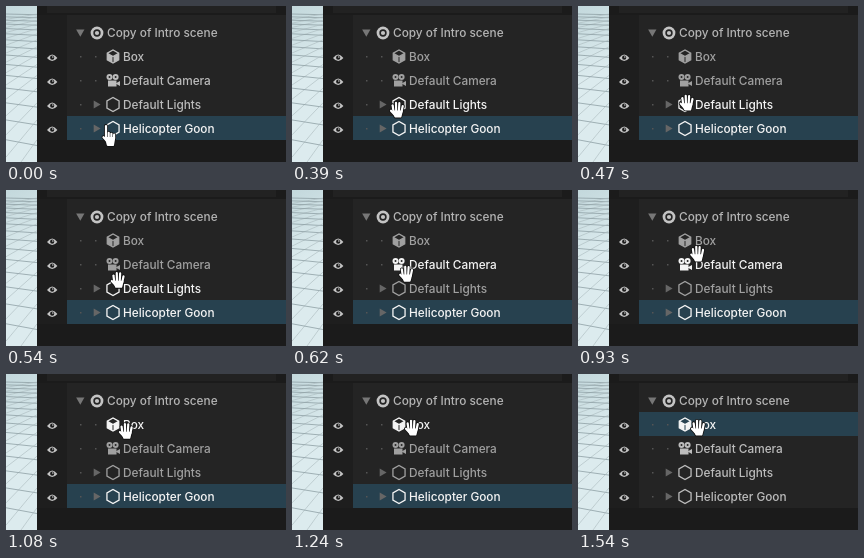
An HTML page with a canvas that plays this animation: 280x156 px, repeating every 2390 ms.

```html
<!DOCTYPE html>
<html lang="en">
<head>
<meta charset="utf-8">
<title>Scene tree drag</title>
<style>
html, body { margin: 0; width: 100%; height: 100%; overflow: hidden; background: #1b1b1b; }
canvas { display: block; }
</style>
</head>
<body>
<canvas id="stage" width="280" height="156"></canvas>
<script>
const ctx = document.getElementById('stage').getContext('2d');
const LOOP = 2390, GRAB = 390, STOP = 1240, DROP = 1540, MOVES = 11;
const NORMAL = '#bcbcbc', DIM = '#a0a0a0', BRIGHT = '#f4f4f4', PANEL = '#242424', SELECTED = '#27414f';
const rows = [['Box', cube], ['Default Camera', camera], ['Default Lights', hexagon], ['Helicopter Goon', hexagon]];
const range = n => [...Array(n).keys()];
const rowY = i => 51 + 24 * i;

// The cursor moves in even steps, rounded down to 10 ms
const steps = range(MOVES + 1).map(k => 10 * Math.floor((GRAB + k * (STOP - GRAB) / MOVES) / 10));

function rect(x, y, w, h, color) {
  ctx.fillStyle = color;
  ctx.fillRect(x, y, w, h);
}

function trace(points, close) {
  ctx.beginPath();
  points.forEach(p => ctx.lineTo(...p));
  if (close) ctx.closePath();
}

function poly(points, color) {
  trace(points, true);
  ctx.fillStyle = color;
  ctx.fill();
}

function line(points, color, width, close) {
  trace(points, close);
  ctx.strokeStyle = color;
  ctx.lineWidth = width;
  ctx.stroke();
}

function disc(x, y, r, color) {
  ctx.beginPath();
  ctx.arc(x, y, r, 0, 7);
  ctx.fillStyle = color;
  ctx.fill();
}

function triangle(x, y, r, angle, color) {
  poly(range(3).map(i => angle + i * Math.PI * 2 / 3)
    .map(a => [x + r * Math.cos(a), y + r * Math.sin(a)]), color);
}

function label(text, x, y, color) {
  ctx.font = '500 11.8px Inter, "Open Sans", sans-serif';
  ctx.fillStyle = color;
  ctx.fillText(text, x, y + 4);
}

const hexPoints = (y, r) => range(6).map(i => {
  const a = (i - 0.5) * Math.PI / 3;
  return [107 + r * Math.cos(a), y + r * Math.sin(a)];
});

function hexagon(y, color) {
  line(hexPoints(y, 7), color, 1.3, true);
}

function cube(y, color, back) {
  const p = hexPoints(y, 6.6), center = [107, y];
  poly(p, color);
  poly([center, p[4], p[5], p[0]], back);
  line([center, p[2]], back, 1);
  line([p[4], center, p[0]], color, 1.2);
  line(p, color, 1.3, true);
}

function camera(y, color, back) {
  for (const x of [103.5, 109.6]) {
    disc(x, y - 3.4, 3, color);
    disc(x, y - 3.4, 1, back);
  }
  rect(102, y, 8.5, 6, color);
  triangle(112.5, y + 3, 3, Math.PI, color);
}

function eye(y) {
  ctx.beginPath();
  ctx.moveTo(41, y + 1);
  ctx.quadraticCurveTo(46.2, y - 6, 51.4, y + 1);
  ctx.quadraticCurveTo(46.2, y + 7, 41, y + 1);
  ctx.fillStyle = '#c4c4c4';
  ctx.fill();
  disc(46.2, y + 0.7, 2.1, '#1c1c1c');
  disc(46.8, y, 0.8, '#c4c4c4');
}

function viewport() {
  const sky = ctx.createLinearGradient(0, 0, 31, 60);
  sky.addColorStop(0, '#c3d8dc');
  sky.addColorStop(1, '#dcebee');
  rect(0, 0, 31, 156, sky);
  for (const i of range(15)) {
    const depth = 18 * 1.16 ** i, y = depth - 10;
    line([[0, y], [31, y + depth * 0.04]], '#8fa0a5', 0.8);
    line([[0, y + depth * 0.3], [31, y]], '#a9b9bd', 0.6);
  }
}

function hand(x, y, open) {
  const tipY = i => open ? 1.3 * (i - 1.4) ** 2 - 6.8 : i ? i * 0.9 - 4 : -10;
  const spread = open ? 1.25 : 1;
  const fingers = range(4).map(i => 2.7 * i - 3.5).map((fx, i) => [[fx, 2], [fx * spread, tipY(i)]]);
  const thumb = [[-2.5, 5], [-6, 1.2]];
  const palm = [[-3.4, 2], [4.6, 2], [3.4, open ? 7 : 9], [-1.6, open ? 7 : 9]];
  ctx.save();
  ctx.translate(x, y);
  ctx.lineCap = ctx.lineJoin = 'round';
  for (const [color, width] of [['#111', 3.8], ['#fff', 2.2]]) {
    for (const part of [...fingers, thumb]) line(part, color, width);
    line(palm, color, width, true);
    poly(palm, color);
  }
  ctx.restore();
}

function cursorAt(t) {
  if (t < GRAB) return [103.5, 130];
  const left = 1 - (steps.filter(s => s <= t).length - 1) / MOVES;
  return [120 - 15 * left ** 3, 53.5 + 50 * left ** 1.6];
}

function draw(t) {
  const dragging = t >= GRAB && t < DROP;
  const selected = t < DROP ? 3 : 0;
  const [x, y] = cursorAt(t);
  const hover = Math.round((y - 50) / 24);

  viewport();
  rect(31, 0, 249, 156, '#1b1b1b');
  rect(31, 9, 30, 125, '#1e1e1e');
  rect(61, 9, 219, 125, PANEL);
  rect(41, 0, 229, 7, '#222');
  rect(61, rowY(selected) - 13, 219, 24, SELECTED);

  triangle(74.3, 26, 4.8, Math.PI / 2, '#777');
  disc(91, 27, 6.4, '#c4c4c4');
  disc(91, 27, 3.7, PANEL);
  disc(91, 27, 2.1, '#c4c4c4');
  label('Copy of Intro scene', 101, 27, '#b4b4b4');

  rows.forEach(([name, icon], i) => {
    const cy = rowY(i);
    const back = i === selected ? SELECTED : PANEL;
    const lit = i === selected || dragging && i === hover;
    const color = lit ? BRIGHT : dragging ? DIM : NORMAL;
    eye(cy);
    rect(74, cy - 1, 1.5, 1.5, '#555');
    if (icon === hexagon) triangle(90, cy - 0.5, 4.6, 0, '#666');
    else rect(89, cy - 1, 1.5, 1.5, '#555');
    icon(cy - 0.5, color, back);
    label(name, 117, cy, color);
  });
  hand(x, y, t >= GRAB);
}

function tick() {
  draw(performance.now() % LOOP);
  requestAnimationFrame(tick);
}
tick();
</script>
</body>
</html>
```
